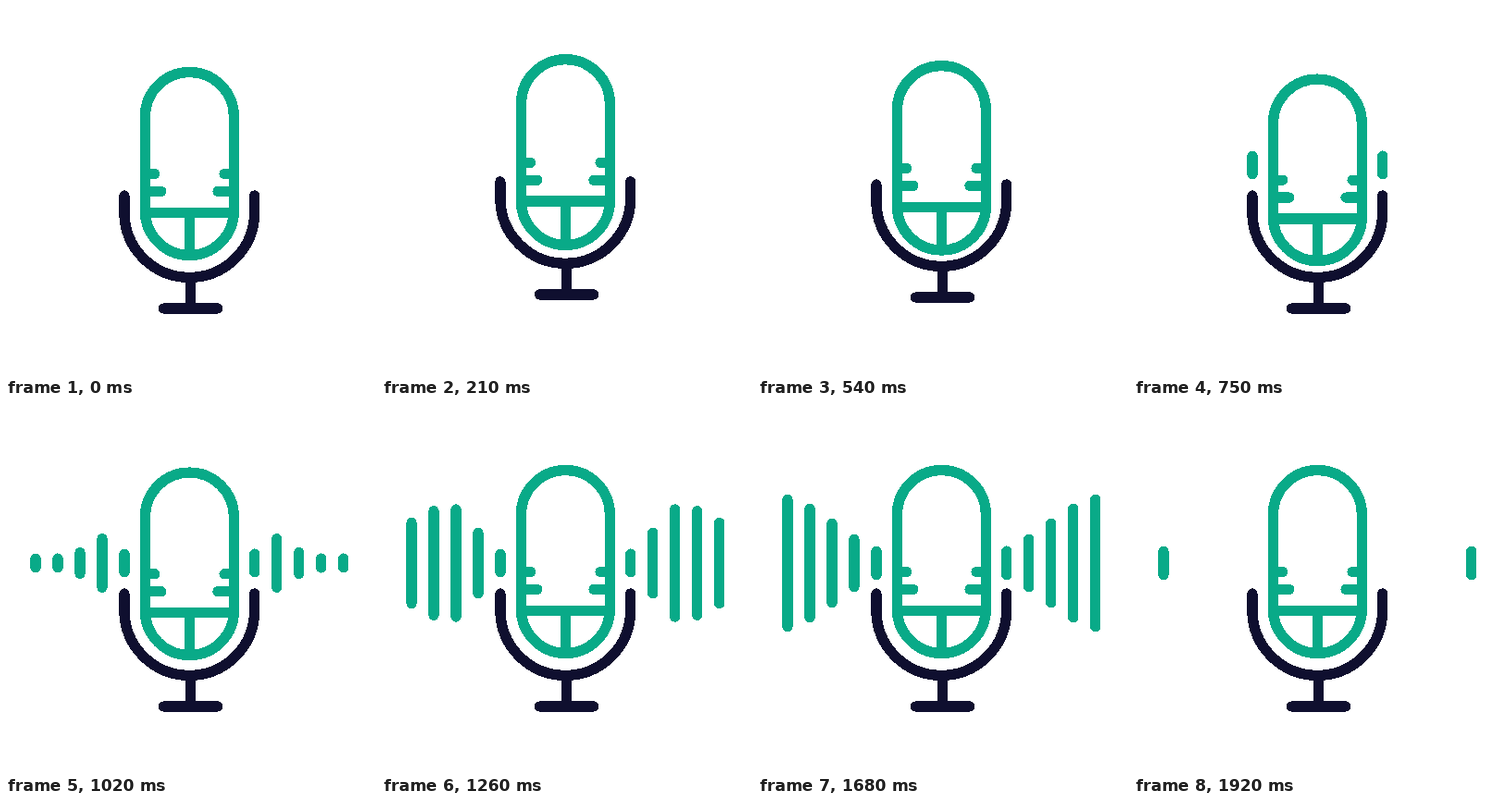
An HTML page that plays this animation: 400x400 px, repeating every 1.95 s.

```html
<!DOCTYPE html>
<html lang="en">
<head>
<meta charset="utf-8">
<title>Microphone</title>
<style>
  html, body { margin: 0; width: 100%; height: 100%; overflow: hidden; background: #fff; }
  svg { display: block; width: 100vw; height: 100vh; shape-rendering: crispEdges; }
  path { fill: none; stroke-width: 11.3; stroke-linecap: round; stroke-linejoin: round; }
  .green { stroke: #09aa88; }
  .navy { stroke: #0f0f2f; }
</style>
</head>
<body>
<svg viewBox="0 0 400 400">
  <path id="bars" class="green"/>
  <path id="stand" class="navy" d="M127.9 205V223a70.4 70.4 0 0 0 140.8 0V205M199.3 293.5V327M170.5 327H228.7"/>
  <path id="body" class="green"/>
</svg>
<script>
const LOOP = 1950, STEP = 30, STAGGER = 60;
const BAR_START = 750, BAR_END = 1710;
const BAR_Y = 172, BAR_GAP = 24, AXIS = 198.4, CAP = 5.6;

const clamp = u => Math.min(1, Math.max(0, u));
const ease = u => (1 - Math.cos(Math.PI * clamp(u))) / 2;
// Eased swing from value a at time t0 to value b at time t1.
const swing = (t, t0, t1, a, b) => a + (b - a) * ease((t - t0) / (t1 - t0));

// The body leaps, dips past its rest position and settles.
function bodyShift(t) {
  if (t < 350) return swing(t, 100, 350, 0, -34);
  return t < 670 ? swing(t, 350, 670, -34, 8) : swing(t, 670, 1240, 8, 0);
}

const standShift = t => -24 * ease(1 - Math.abs(t - 360) / 360);

// Each bar pulses twice, then shrinks away.
function barHeight(t) {
  if (t < 1125) return swing(t, 835, 1125, 21, 130);
  if (t < 1270) return swing(t, 1125, 1270, 130, 29);
  return t < 1405 ? swing(t, 1270, 1405, 29, 152) : swing(t, 1405, 1740, 152, 27);
}

const innerHeight = t => swing(t, 1260, 1680, 31, 37);

const $ = id => document.getElementById(id);
const bars = $('bars'), stand = $('stand'), body = $('body');

function bodyPath(shift) {
  const radius = 48, left = AXIS - radius, right = AXIS + radius;
  const top = 71.5 + shift, bottom = 269.5 + shift * 0.8, mid = shift * 0.88;
  const bar = 223.3 + mid;
  const notch = (y, length) => `M${left} ${y + mid}h${length}M${right} ${y + mid}h${-length}`;
  return `M${left} ${top + radius}a48 48 0 0 1 96 0V${bottom - radius}a48 48 0 0 1 -96 0Z`
    + `M${left} ${bar}H${right}M${AXIS} ${bar}V${bottom}`
    + notch(181.5, 10.3) + notch(200.4, 17.4);
}

function barsPath(time) {
  let d = '';
  for (let i = 0; i < 5; i++) {
    const t = time - i * STAGGER;
    if (t < BAR_START || t >= BAR_END) continue;
    const half = (i ? barHeight(t) : innerHeight(t)) / 2 - CAP;
    const offset = 70.4 + BAR_GAP * i;
    for (const x of [AXIS - offset, AXIS + offset]) d += `M${x} ${BAR_Y - half}V${BAR_Y + half}`;
  }
  return d;
}

function draw(time) {
  body.setAttribute('d', bodyPath(bodyShift(time)));
  stand.setAttribute('transform', `translate(0 ${standShift(time)})`);
  bars.setAttribute('d', barsPath(time));
}

let start;
function tick(now) {
  start ??= now;
  draw(Math.floor(Math.max(0, now - start) % LOOP / STEP) * STEP);
  requestAnimationFrame(tick);
}
draw(0);
requestAnimationFrame(tick);
</script>
</body>
</html>
```
